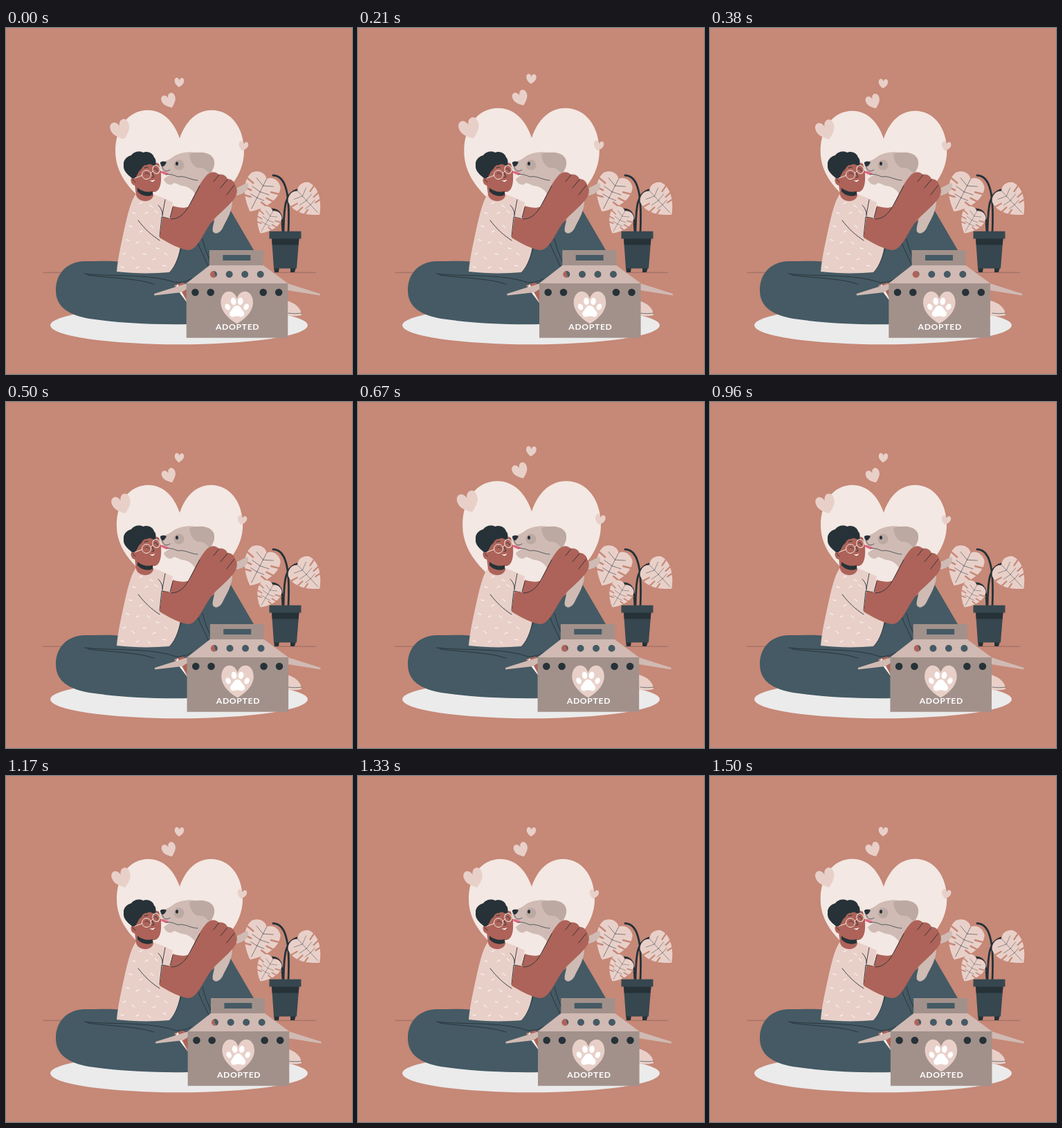
Animation, 500 px wide and 500 px high, one loop 1540 ms. Source, as an HTML page:

```html
<!DOCTYPE html>
<html lang="en">
<head>
<meta charset="utf-8">
<title>Adopted</title>
<style>
  html, body { margin: 0; width: 100%; height: 100%; overflow: hidden; background: #c68877; }
  svg { display: block; width: 100vw; height: 100vh; }
  .line { fill: none; stroke: #263238; stroke-linecap: round; stroke-linejoin: round; }
  .dark { fill: #263238; }
  .jeans { fill: #455a64; }
  .skin { fill: #ad6359; }
  .pink { fill: #e8d0c9; }
  .fur { fill: #cfbbb4; }
  .front { fill: #a2918b; }
  .lid { fill: #d0bab3; }
  text { font: 700 12.2px Lato, sans-serif; letter-spacing: .65px; fill: #fff; text-anchor: middle; }
</style>
</head>
<body>
<svg viewBox="0 0 500 500">
  <defs>
    <path id="heart" d="M0 10C-7 6-10 1-10-3C-10-7-8-10-5-10C-2.500-10-.7-8 0-5.500C.7-8 2.500-10 5-10C8-10 10-7 10-3C10 1 7 6 0 10Z"/>
    <path id="charm" d="M0 11C-7 6-10.500 2-10.500-3.500C-10.500-8-8-10-5.500-10C-2.500-10-.5-7 0-4C.5-7 2.500-10 5.500-10C8-10 10.500-8 10.500-3.500C10.500 2 7 6 0 11Z"/>
    <g id="leaf">
      <path class="pink" d="M0-19C-4-27-17-27-24-18C-32 0-17 22 0 35C17 22 32 0 24-18C17-27 4-27 0-19Z"/>
      <path d="M-28-8L-15-5M-27 6L-13 6M-19 17L-9 15M28-8L15-5M27 6L13 6M19 17L9 15" fill="none" stroke="#c68877" stroke-width="2.600" stroke-linecap="round"/>
      <path class="line" stroke-width=".5" d="M0-19V30M0-8L-14-14M0-8L14-14M0 2L-14 0M0 2L14 0M0 12L-11 11M0 12L11 11"/>
    </g>
  </defs>

  <rect width="500" height="500" fill="#c68877"/>
  <path class="line" stroke-width=".3" d="M54 353.300H448"/>
  <ellipse cx="250" cy="429.700" rx="186" ry="27.500" fill="#ebebeb"/>

  <g id="hearts">
    <path fill="#f3e8e3" d="M251 160C243 136 227 120 206 120C178 120 160 145 160 178C160 225 205 255 251 284C297 255 342 225 342 178C342 145 324 120 296 120C275 120 259 136 251 160Z"/>
    <g class="pink">
      <use href="#charm" transform="translate(250.300 80.500) rotate(4) scale(.64)"/>
      <use href="#charm" transform="translate(236 106.500) rotate(-22) scale(.96)"/>
      <use href="#charm" transform="translate(167.500 147.500) rotate(-20) scale(1.300)"/>
      <use href="#charm" transform="translate(341 170.500) rotate(12) scale(.64)"/>
    </g>
  </g>

  <g id="plant">
    <path class="line" stroke-width="2.800" d="M400 295C399 272 398 262 383 262M408 295C410 252 408 213 386 213M401 295C402 265 401 240 420 234"/>
    <use href="#leaf" transform="translate(368 235) rotate(27) scale(.97)"/>
    <use href="#leaf" transform="translate(433 248) rotate(-43) scale(.85)"/>
    <use href="#leaf" transform="translate(379 276.500) rotate(30) scale(.66)"/>
    <path class="dark" d="M387 346H395L394 353H388ZM411 346H419L417 353H411Z"/>
    <path fill="#37474f" d="M384 304H423.500L420 347.500H387Z"/>
    <path class="dark" d="M384 304H423.500L422.800 313.500H384.700Z"/>
    <path fill="#37474f" d="M380.500 293.700H426.500V304.500H380.500Z"/>
  </g>

  <g id="legs">
    <path class="pink" d="M405 394C418 397 427 405 427 415C420 417 412 416 405 416Z"/>
    <path class="line" stroke-width=".6" d="M408 412C414 413 421 413 427 412"/>
    <path class="skin" d="M246 368L302 345V400H266Z"/>
    <path fill="#fff" d="M244 378L248 370L266 405H258Z"/>
    <path class="jeans" d="M236 354C245 342 250 328 252 314L323 261L358 321L382 366V400H312L300 348L262 372Z"/>
    <path class="jeans" d="M115 337C88 337 72 355 72 379C72 404 92 415 120 420C160 426 210 429 264 428V400L243 372L260 366L236 352L160 351L168 338C150 336 132 337 115 337Z"/>
    <path class="line" stroke-width=".9" d="M113 355C150 360 205 354 246 368C254 368 262 366 268 362M118 357C155 362 185 361 214 370M236 353C248 341 249 327 256 312M276 307C281 322 288 334 294 348M284 305C287 319 292 330 298 343"/>
  </g>

  <g id="torso">
    <path class="pink" d="M190 237C182 245 177 264 172 286C167 309 162 330 160 352C185 355 213 355 236 353C245 344 251 327 252 312L222 302L226 273L236 274L241 252C230 247 222 243 212 240Z"/>
    <path id="flecks" fill="none" stroke="#fff" stroke-width="1" stroke-linecap="round"/>
    <path class="line" stroke-width=".9" d="M191 278C201 291 210 299 222 307M226 272C227 266 224 260 220 256M222 301L225 273L235 275M230 248L226 270"/>
  </g>

  <g id="dog">
    <path class="fur" d="M325 232C336 233 342 225 349 224C352 229 348 240 333 242ZM300 262C305 276 297 286 299 294C303 300 311 295 314 287C319 277 328 263 327 248Z"/>
    <path class="fur" d="M225 194C233 192 238 189 243 185C252 179 270 177 283 182L298 207L288 224L275 243C270 233 263 229 254 228C248 226 245 224 242 224C238 230 229 224 228 218L238 211C230 212 224 206 223 199Z"/>
    <circle cx="250" cy="198" r="7.500" fill="#bca9a2"/>
    <path fill="#bca9a2" d="M265 182C275 179 291 178 298 186C304 193 301 205 294 210C290 207 288 202 281 202C272 203 266 194 265 182Z"/>
    <path class="dark" d="M223 196C222 192 229 192 232 194C230 198 228 201 225 200Z"/>
    <ellipse class="dark" cx="247" cy="196" rx="2" ry="2.800"/>
    <path d="M222 207C226 206 231 208 236 211C232 213 226 212 222 207Z" fill="#df6784"/>
    <path class="line" stroke-width=".7" d="M226 201C228 209 234 207 237 205M231 212C240 210 244 214 249 215C259 213 267 220 277 220"/>
  </g>

  <g id="arms">
    <path class="skin" d="M241 257C251 260 258 261 264 258C273 240 280 224 288 215C294 207 302 206 308 212C314 210 319 215 320 218C326 218 331 223 331 227C336 233 334 242 328 249C318 261 306 270 299 278C286 293 278 320 264 321C252 320 235 311 222 303L226 274L237 275Z"/>
    <path class="line" stroke-width=".9" d="M239 276C252 276 260 266 266 254L280 228M241 259L237 274M300 222L308 212M310 231L320 219M319 241L330 227"/>
  </g>

  <g id="head">
    <path class="skin" d="M184 211L188 241C190 252 210 254 213 242L212 237C223 238 225 224 224 209L221 196L204 190L188 202Z"/>
    <path class="dark" d="M190 231C196 236 204 238 212 236L212 241C205 245 195 242 190 236Z"/>
    <path class="skin" d="M189 216C183 213 179 217 181 223C183 229 190 229 193 224Z"/>
    <path class="dark" d="M182 217C175 211 169 206 170 198C169 189 177 185 181 184C184 179 193 177 198 180C206 177 213 182 214 187C218 190 216 197 216 200C211 198 207 195 204 198C197 197 197 204 193 206C191 209 189 213 187 217Z"/>
    <path class="line" stroke-width=".9" d="M201 211C203 208 206 210 207 212M214 204C216 202 219 204 219 207M200 202L205 201M211 209L214 215L211 216M183 219L187 223"/>
    <path d="M208 220C211 221 213 220 215 219C214 223 210 223 208 220Z" fill="#fff"/>
    <path d="M186 217L197 213M209 210L212 207" stroke="#f3e8e3"/>
    <circle cx="203" cy="212" r="6.500" fill="none" stroke="#f3e8e3"/>
    <ellipse cx="217" cy="204.500" rx="5" ry="6" fill="none" stroke="#f3e8e3" transform="rotate(-18 217 204.500)"/>
  </g>

  <g id="box">
    <path class="lid" d="M262 369L214.500 384V386.500L254 382L262 377ZM407 369L454 384V386.500L407 379Z"/>
    <path class="front" fill-rule="evenodd" d="M294.300 321H372.300V344H294.300ZM313.700 328V336H353.700V328Z"/>
    <path id="lid" class="lid" fill-rule="evenodd"/>
    <path class="front" d="M261 369H407.600V447.700H261Z"/>
    <g id="vents" class="dark"></g>
    <use href="#heart" class="pink" transform="translate(334 404) scale(2.330)"/>
    <g fill="#fff">
      <path d="M334 401C339 401 340 406 343 409C347 414 343 419 338 417C335 416 333 416 330 417C325 419 321 414 325 409C328 406 329 401 334 401Z"/>
      <ellipse cx="329" cy="395" rx="3.800" ry="5.300" transform="rotate(-8 329 395)"/>
      <ellipse cx="339" cy="395" rx="3.800" ry="5.300" transform="rotate(8 339 395)"/>
      <ellipse cx="320.500" cy="403" rx="3.500" ry="4.800" transform="rotate(-28 320.500 403)"/>
      <ellipse cx="347.500" cy="403" rx="3.500" ry="4.800" transform="rotate(28 347.500 403)"/>
    </g>
    <text x="334.900" y="436.300">ADOPTED</text>
  </g>
</svg>
<script>
const LOOP = 1540, CYCLE = 1529, LEAD = 0.029;
const SWAY = [0, -1, 2, -4, 4, -4, 4, -4, 2, -1, 0];
const byId = id => document.getElementById(id);

// Open holes in the lid, solid ones on the front
const hole = x => `M${x - 5} 356a5 5 0 1 0 10 0a5 5 0 1 0 -10 0Z`;
byId('lid').setAttribute('d',
  'M294.300 343H372.300L407.600 369H261Z' + [300.3, 323, 345.5, 368].map(hole).join(''));
byId('vents').innerHTML = [273.7, 296, 372, 394.5]
  .map(x => `<circle cx="${x}" cy="382" r="5.300"/>`).join('');

const flecks = [[195, 254], [210, 256], [185, 267], [203, 268], [217, 264], [180, 286], [195, 295],
  [211, 285], [176, 306], [190, 311], [206, 309], [219, 318], [171, 327], [184, 331], [200, 326],
  [214, 335], [231, 325], [168, 345], [190, 347], [207, 346], [229, 343]];
byId('flecks').setAttribute('d', flecks.map(([x, y], i) =>
  `M${x - 2} ${y}l4 ${[-2, 3, 1][i % 3]}`).join(''));

const smooth = x => {
  x = Math.min(1, Math.max(0, x));
  return x * x * (3 - 2 * x);
};
const beat = p => p < 0.1 ? smooth(p / 0.1) : 1 - smooth((p - 0.1) / 0.2);

function draw(now) {
  const phase = ((now % LOOP) / CYCLE + LEAD) % 1;
  const scale = 1 + 0.1 * (phase < 0.35 ? beat(phase) : beat(phase - 0.35));
  const step = Math.floor(phase * 10), part = phase * 10 - step;
  const shift = SWAY[step] + (SWAY[step + 1] - SWAY[step]) * part;
  byId('hearts').setAttribute('transform', `translate(250.500 178) scale(${scale}) translate(-250.500 -178)`);
  byId('box').setAttribute('transform', `translate(${shift})`);
}

const start = performance.now();
function tick() {
  draw(performance.now() - start);
  requestAnimationFrame(tick);
}
tick();
</script>
</body>
</html>
```
